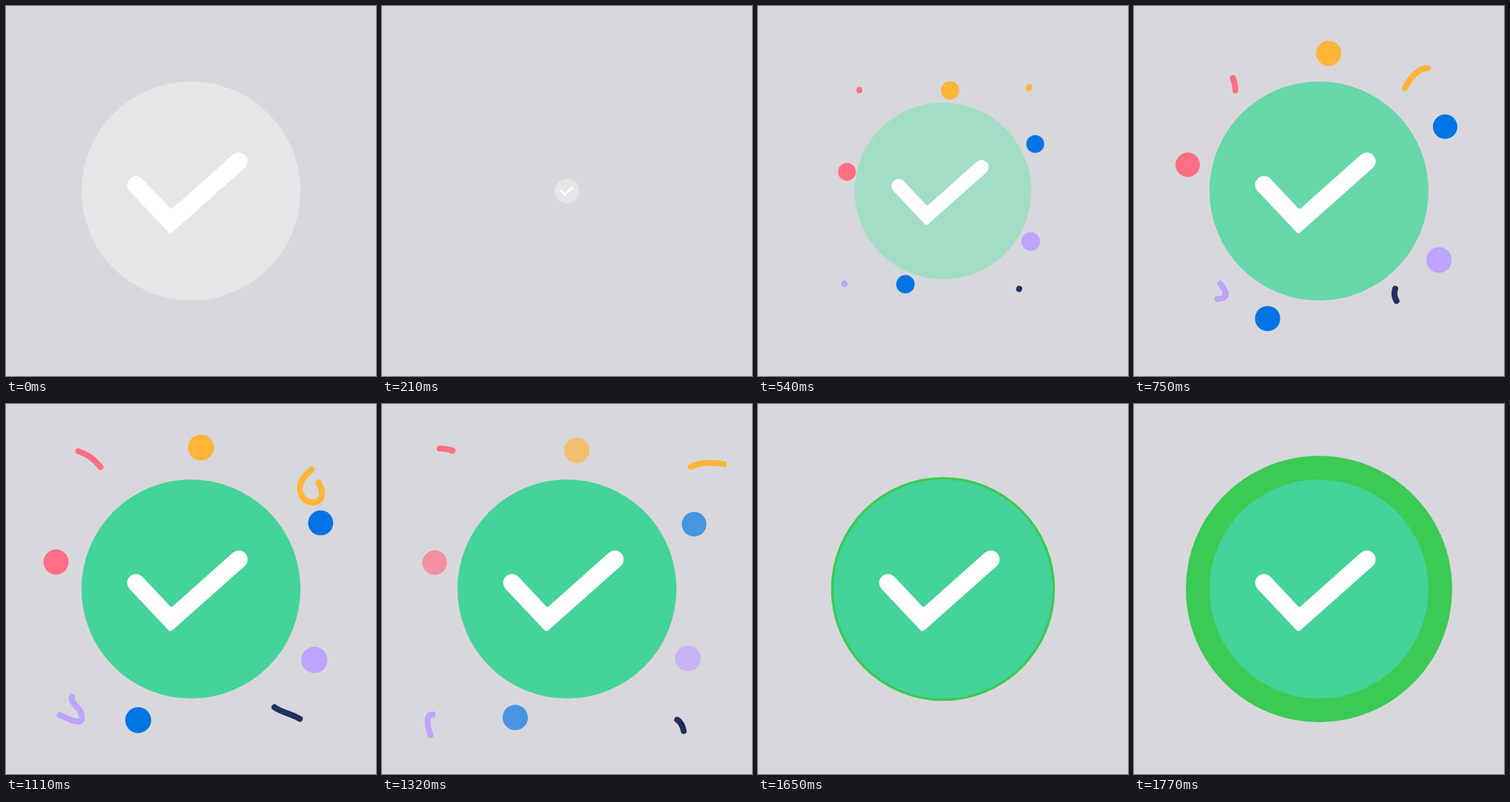
Write an HTML page that moves like this. It is 500 px wide and 500 px high and loops after 1830 ms.

```html
<!DOCTYPE html>
<html>
<head>
<meta charset="utf-8">
<style>
  html, body { margin: 0; height: 100%; overflow: hidden; background: #d8d7dc; }
  svg { display: block; width: 100%; height: 100%; }
  #ribbons path { fill: none; stroke-width: 8; stroke-linecap: round; }
</style>
</head>
<body>
<svg viewBox="0 0 500 500">
  <g id="dots">
    <circle cx="13.5" cy="-191.5" r="17.5" fill="#ffb638"/>
    <circle cx="175.5" cy="-89.5" r="17" fill="#0074e4"/>
    <circle cx="167" cy="96" r="17.8" fill="#bea3ff"/>
    <circle cx="-71.5" cy="177.5" r="17.5" fill="#0074e4"/>
    <circle cx="-182.7" cy="-36.5" r="17" fill="#ff6e84"/>
  </g>
  <g id="ribbons">
    <path pathLength="100" stroke="#ff6e84" d="M137 114C137 104 133 94 129 87C122 77 111 68 98 64C90 61 83 60 76 60"/>
    <path pathLength="100" stroke="#ffb638" d="M366 111C373 97 384 84 397 84C408 84 416 95 421 104C425 111 428 117 427 123C426 130 421 133 414 133C404 133 397 124 397 113C398 102 407 93 416 86C431 77 450 79 467 82"/>
    <path pathLength="100" stroke="#bea3ff" d="M116.5 375C119 379 124 384 124 389C124 394 119 396 113 396C105 395 96 390 90 394C84 402 99 409 102 419C104 427 101 430 95 429C87 428 80 423 72 420C58 416 60 434 67 451"/>
    <path pathLength="100" stroke="#1f305f" d="M353 382C351 388 352 394 355 399C357 404 360 407 363 410C373 417 387 419 399.5 427C405 431 407 437 408 444"/>
  </g>
  <circle id="ring" cx="250" cy="250" fill="#3bca54"/>
  <g id="badge">
    <circle id="disc" cx="250" cy="250" r="148"/>
    <path fill="#fff" d="M183.7 232.8L220.9 272.3Q223 275.6 226 272.8L306.5 201A12 12 0 0 1 322.5 219L225.5 305.2Q222.5 308.6 219.6 305.7L166.3 249.2A12 12 0 0 1 183.7 232.8Z"/>
  </g>
</svg>
<script>
const LOOP = 1830, STEP = 30;
const $ = id => document.getElementById(id);
const set = (el, attrs) => { for (const k in attrs) el.setAttribute(k, attrs[k]); };
const ramp = (t, from, to) => Math.min(1, Math.max(0, (t - from) / (to - from)));
const ease = (t, from, to) => { const u = ramp(t, from, to); return u * u * (3 - 2 * u); };
const mix = (a, b, u) => a.map((v, i) => Math.round(v + (b[i] - v) * u));

function draw(t) {
  // Badge shrinks away, then pops back while turning green
  const scale = t < 265 ? 1 - ease(t, 0, 265) : ease(t, 265, 648);
  set($('badge'), { transform: `translate(250 250) scale(${scale}) translate(-250 -250)` });
  set($('disc'), { fill: `rgb(${mix([230, 230, 230], [68, 211, 152], ramp(t, 300, 870))})` });

  // Dots burst out, settle, then drift back and fade
  const burst = 1.012 * (1 - Math.exp(-Math.max(0, t - 413) / 105));
  const drift = 1.138e-7 * Math.max(0, t - 780) ** 2;
  set($('dots'), {
    transform: `translate(250 250) scale(${Math.max(0, burst - drift)})`,
    opacity: 1 - ramp(t, 1180, 1600)
  });

  // Each ribbon is the part of its path between tail and head
  const head = 100 * ease(t, 500, 1400), tail = 100 * ease(t, 840, 1530);
  set($('ribbons'), { visibility: t > 500 && t < 1530 ? 'visible' : 'hidden' });
  for (const path of $('ribbons').children) {
    set(path, {
      'stroke-dasharray': `${Math.max(0.05, head - tail)} 300`,
      'stroke-dashoffset': -Math.min(tail, 99.9)
    });
  }

  set($('ring'), { r: t > 1620 ? 148 + 32 * ease(t, 1620, 1770) : 0 });
}

const start = performance.now();
function frame() {
  const t = (performance.now() - start) % LOOP;
  draw(Math.floor(t / STEP) * STEP);
  requestAnimationFrame(frame);
}
frame();
</script>
</body>
</html>
```
